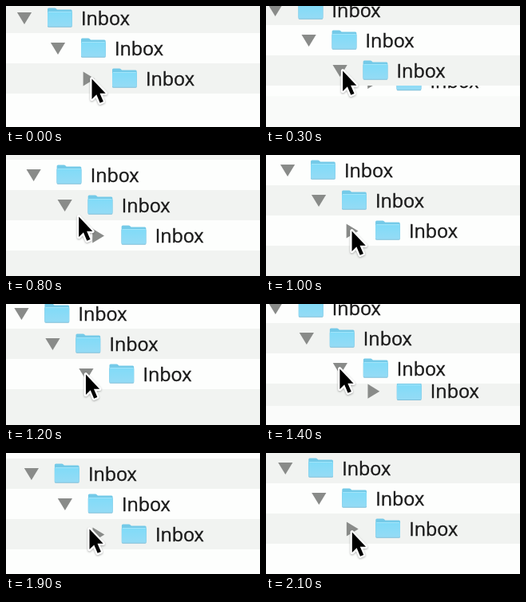
An HTML page that plays this animation: 318x152 px, repeating every 2.2 s.

```html
<!DOCTYPE html>
<html lang="en">
<head>
<meta charset="utf-8">
<title>Nested inboxes</title>
<style>
  html, body { margin: 0; width: 100%; height: 100%; overflow: hidden; background: #fdfefd; }
  svg { display: block; width: 318px; height: 152px; }
  text { font: 23.3px "Open Sans", "Noto Sans", sans-serif; fill: #1a1a1a; stroke: #1a1a1a; stroke-width: .4px; }
  .arrow { fill: #898b89; }
  #cursor { filter: drop-shadow(0 1px 1px rgba(0, 0, 0, .3)); }
</style>
</head>
<body>
<svg viewBox="0 0 318 152">
  <defs>
    <linearGradient id="front" x2="0" y2="1">
      <stop offset="0" stop-color="#80dbf8"/>
      <stop offset="1" stop-color="#94dbf5"/>
    </linearGradient>
    <g id="folder">
      <path d="M0 23V2.5Q0 1 1.5 1H9Q10 1 11 2L12 3H29.2Q30.7 3 30.7 4.5V23Z" fill="#74cae8"/>
      <rect y="5.5" width="30.7" height="19.8" rx="1.5" fill="#7fbfd8"/>
      <rect y="5.5" width="30.7" height="18.8" rx="1.5" fill="url(#front)"/>
      <path d="M1 6H29.7" stroke="#a2e5fa"/>
    </g>
  </defs>
  <g id="world">
    <rect id="tail" width="420" height="240"/>
    <g id="rows"></g>
    <g id="cursor">
      <path d="M0 0V25.5L5.8 19.8L10.2 30.2L14.4 28.4L10 18.2H17.2Z"
            fill="#000" stroke="#fff" stroke-width="4.6" stroke-linejoin="round" paint-order="stroke"/>
    </g>
  </g>
</svg>
<script>
  const LOOP = 2200, STEP = 100, ROW = 38;
  const indents = [0, 42, 81, 123, 165];
  const GRAY = [241, 243, 241], WHITE = [253, 254, 253];
  const el = id => document.getElementById(id);
  const move = (node, x, y) => node.setAttribute('transform', `translate(${x} ${y})`);
  const mix = k => `rgb(${WHITE.map((w, i) => Math.round(w + (GRAY[i] - w) * k))})`;
  const ease = (t, from, to) => {
    const k = Math.min(1, Math.max(0, (t - from) / (to - from)));
    return k * k * (3 - 2 * k);
  };

  // Deeper rows come first, so each parent hides the child sliding out beneath it.
  el('rows').innerHTML = indents.map((x, i) => `<g id="row${i}">
    <rect width="420" height="${ROW}" fill="${mix(i % 2 ? 0 : 1)}"/>
    <path id="arrow${i}" class="arrow" d="M-9.1 -7.4H9.1L0 7.4Z"/>
    <use href="#folder" x="${52 + x}" y="5.5"/>
    <text x="${94 + x}" y="28">Inbox</text></g>`).reverse().join('');

  function turn(i, open) {
    el('arrow' + i).setAttribute('transform',
      `translate(${23 + indents[i]} 19.5) rotate(${open ? 0 : -90})`);
  }

  function draw(now) {
    const t = Math.floor(now % LOOP / STEP) * STEP;
    const first = ease(t, 180, 480), second = ease(t, 1200, 1500);
    const shown = [0, 1, 2, 2 + first, 2 + first + second];

    move(el('world'), -83.5 * t / LOOP, Math.round(-75.8 * t / LOOP));
    shown.forEach((n, i) => {
      move(el('row' + i), 0, n * ROW - 4);
      turn(i, i < 2 || (i === 2 && t >= 150) || (i === 3 && t >= 1150));
    });
    move(el('tail'), 0, (shown[4] + 1) * ROW - 4);
    el('tail').setAttribute('fill', mix(first - second));

    const hop = ease(t, 660, 1000), next = ease(t, 1700, 2000);
    move(el('cursor'), 107.5 + 38 * hop + 42 * next, 91.5 + 38 * hop + 42 * next);
  }

  const start = performance.now();
  function tick() {
    draw(performance.now() - start);
    requestAnimationFrame(tick);
  }
  tick();
</script>
</body>
</html>
```
